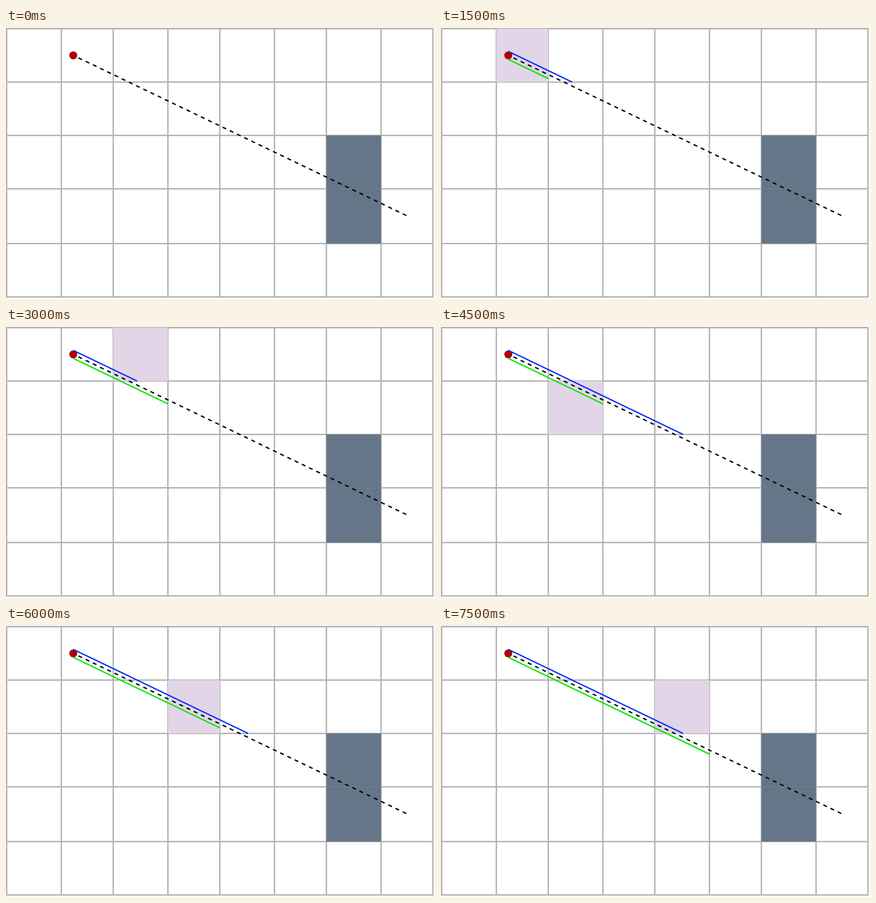
Animation, 942 px wide and 594 px high, one loop 8000 ms. Source, as an HTML page with a canvas:

```html
<!DOCTYPE html>
<html lang="en">
<head>
<meta charset="utf-8">
<title>Grid ray traversal</title>
<style>
  html, body { margin: 0; width: 100%; height: 100%; overflow: hidden; background: #fff; }
  canvas { display: block; }
</style>
</head>
<body>
<canvas id="stage" width="942" height="594"></canvas>
<script>
const ctx = document.getElementById('stage').getContext('2d');
const LOOP = 8000, STEP = 1500;
const CELL = 117, UNIT = CELL / 40;
const columns = [1.5, 121.5, 235.5, 355.5, 469.5, 589.5, 703.5, 823.5, 937.5];
const rows = [1.5, 118.5, 235.5, 352.5, 472.5, 589.5];
const origin = { x: 147.75, y: 60 };
const goal = { x: 879, y: 411 };
const slope = (goal.y - origin.y) / (goal.x - origin.x);
const RADIUS = 3 * UNIT;

// Visited cell, next vertical grid line (green), next horizontal grid line (blue)
const steps = [
  null,
  { col: 1, row: 0, nextCol: 2, nextRow: 1 },
  { col: 2, row: 0, nextCol: 3, nextRow: 1 },
  { col: 2, row: 1, nextCol: 3, nextRow: 2 },
  { col: 3, row: 1, nextCol: 4, nextRow: 2 },
  { col: 4, row: 1, nextCol: 5, nextRow: 2 }
];

function line(x1, y1, x2, y2, color, width = UNIT, dash = []) {
  ctx.strokeStyle = color;
  ctx.lineWidth = width;
  ctx.setLineDash(dash);
  ctx.beginPath();
  ctx.moveTo(x1, y1);
  ctx.lineTo(x2, y2);
  ctx.stroke();
}

function fillCell(col, row, color) {
  const x = columns[col], y = rows[row];
  ctx.fillStyle = color;
  ctx.fillRect(x, y, columns[col + 1] - x, rows[row + 1] - y);
}

function draw(time) {
  const step = steps[Math.floor((time % LOOP) / STEP)];
  ctx.fillStyle = '#fff';
  ctx.fillRect(0, 0, 942, 594);

  for (const x of columns) line(x, 0, x, 591, '#b3b3b3', 3);
  for (const y of rows) line(0, y, 939, y, '#b3b3b3', 3);
  fillCell(6, 2, '#647687');
  fillCell(6, 3, '#647687');
  if (step) fillCell(step.col, step.row, '#e1d5e7');

  line(goal.x, goal.y, origin.x, origin.y, '#000', UNIT, [3 * UNIT, 3 * UNIT]);
  ctx.fillStyle = '#b20000';
  ctx.beginPath();
  ctx.arc(origin.x, origin.y, RADIUS, 0, 2 * Math.PI);
  ctx.fill();

  if (step) {
    const top = origin.y - RADIUS, bottom = origin.y + RADIUS;
    const blueY = rows[step.nextRow], greenX = columns[step.nextCol];
    line(origin.x, top, origin.x + (blueY - top) / slope, blueY, '#002cff');
    line(origin.x, bottom, greenX, bottom + (greenX - origin.x) * slope, '#00e800');
  }
}

const start = performance.now();
function tick() {
  draw(performance.now() - start);
  requestAnimationFrame(tick);
}
tick();
</script>
</body>
</html>
```
